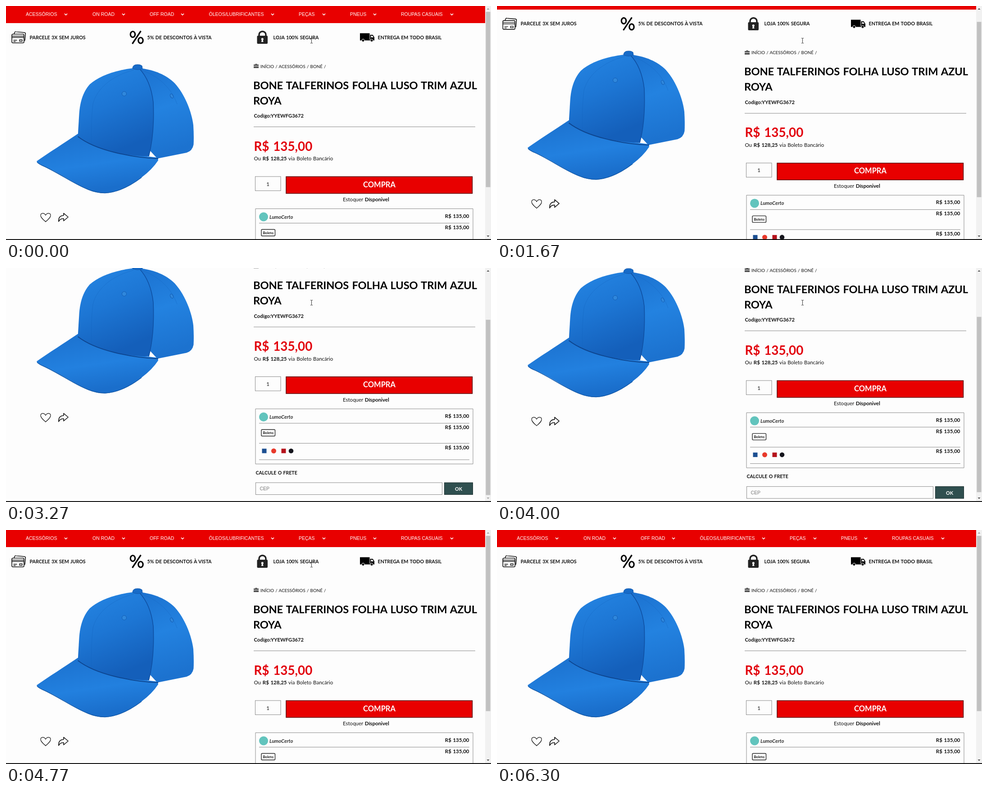
Write an HTML page that moves like this. It is 1077 px wide and 520 px high and loops after 6330 ms.

```html
<!DOCTYPE html>
<html lang="pt-BR">
<head>
<meta charset="utf-8">
<title>Loja</title>
<style>
html, body { margin: 0; width: 100%; height: 100%; overflow: hidden; background: #fdfdfd; }
svg { display: block; width: 1077px; height: 520px; }
text { font: 11.5px Lato, sans-serif; word-spacing: .07em; fill: #111; }
.b, .b text { font-weight: 700; }
.caps { font-size: 10.7px; }
.title { font-size: 23.7px; letter-spacing: -.006em; fill: #000; }
.arial { font: 10.5px "Liberation Sans", Arial, sans-serif; word-spacing: 0; }
.mid { text-anchor: middle; }
.end { text-anchor: end; }
.line { fill: none; stroke: #111; stroke-width: 1.6; stroke-linejoin: round; stroke-linecap: round; }
.rule { fill: none; stroke: #8a8a8a; }
</style>
</head>
<body>
<svg viewBox="0 0 1077 520">
  <defs>
    <linearGradient id="front" x1="0" y1="0" x2=".35" y2="1">
      <stop offset="0" stop-color="#2586e4"/><stop offset=".5" stop-color="#1d76d4"/><stop offset="1" stop-color="#145fba"/>
    </linearGradient>
    <linearGradient id="back" x1="0" y1="0" x2=".2" y2="1">
      <stop offset="0" stop-color="#1c72d0"/><stop offset=".5" stop-color="#2382e0"/><stop offset="1" stop-color="#1c72cf"/>
    </linearGradient>
    <linearGradient id="brim" x1="0" y1="0" x2=".3" y2="1">
      <stop offset="0" stop-color="#1b70cd"/><stop offset=".6" stop-color="#2280df"/><stop offset="1" stop-color="#1a6ecb"/>
    </linearGradient>
  </defs>

  <g id="page">
    <path d="M0 0H1064V38H0z" fill="#e80000"/>
    <g id="nav"></g>

    <!-- benefits -->
    <g class="line">
      <path d="M18 62L19 59Q19.500 57 22 57.300L41 59Q43.500 59.300 43.300 62L42 76L40 77"/>
      <rect x="13" y="62.500" width="27" height="19.500" rx="2.500"/>
      <path d="M13 67H40M13 70H40M17 76H24M17 79H21M30 75H36V78.500H30z" stroke-width="1.300"/>
    </g>
    <g fill="none" stroke="#000">
      <ellipse cx="281.500" cy="63" rx="5.200" ry="6.500" stroke-width="3.200"/>
      <ellipse cx="299" cy="76.500" rx="5.200" ry="6.500" stroke-width="3.200"/>
      <path d="M299.500 55.500L280.500 84" stroke-width="3.200"/>
    </g>
    <path d="M562 68V63.500A7.500 7 0 0 1 577 63.500V68" fill="none" stroke="#222" stroke-width="3.500"/>
    <rect x="557.500" y="66" width="23.500" height="18" rx="2" fill="#222"/>
    <path d="M569.300 71a2.600 2.600 0 0 1 1.400 4.800L571.500 80H567L567.900 75.800A2.600 2.600 0 0 1 569.300 71z" fill="#fff"/>
    <path d="M786 60.500H807.500V75.500H786zM808.500 64H814.500L818 69.500V76.500H786V75H808.500z"/>
    <path d="M810.500 66H813.800L816 69.700H810.500z" fill="#fff"/>
    <g stroke="#fdfdfd"><circle cx="793" cy="76.500" r="3"/><circle cx="812" cy="76.500" r="3"/></g>
    <g id="perks" class="b"></g>

    <!-- cap -->
    <path d="M296 138C330 142 356 153 375 172C400 200 413 240 416 265Q417.500 290 416.500 308Q414 322 401 326L336 339L300 300z" fill="url(#back)"/>
    <path d="M159.500 284C130 304 95 326 68 345Q69 349 78 353C118 370 150 394 182 408Q200 416 220 416C248 415 276 400 301 381Q325 363 338 343L337 337L240 325z" fill="url(#brim)"/>
    <path d="M69 347Q74 352 84 356C121 373 151 396 183 408Q200 415 220 415.500C248 414 276 400 301 381" fill="none" stroke="#1459a8" stroke-width="1.500"/>
    <path d="M283 138C240 143 206 156 186 174C170 192 164 216 162.500 240L159.500 290Q190 312 240 325Q280 334 317 334C326 300 329 260 327 214C322 180 312 155 296 138z" fill="url(#front)"/>
    <path d="M159.500 290Q188 312 240 325T338 339" fill="none" stroke="#0d458f" stroke-width="2"/>
    <path d="M296 139C315 159 324 188 327 214C329 260 326 300 317 334" fill="none" stroke="#0f50a3" stroke-width="1.600"/>
    <path d="M284 142C236 155 202 182 193 218Q188 260 190 306M300 142C337 155 367 181 380 218" fill="none" stroke="#1565bf" opacity=".45"/>
    <path d="M281 139Q281 132 288 130.500Q297 129 302 133L303 139Q292 144 281 139z" fill="#176bc8" stroke="#1258ad"/>
    <g fill="#2f87dc" stroke="#135cb2"><circle cx="262.500" cy="195" r="5"/><ellipse cx="368" cy="200" rx="3" ry="5" transform="rotate(-25 368 200)"/></g>

    <path class="line" style="stroke-width:1.200" d="M88 479.500C82 474 77 470 77 465.500C77 459 85 459 88 465C91 459 99 459 99 465.500C99 470 94 474 88 479.500z"/>
    <path class="line" d="M128 460.500L138 469L128 477.500V472.500Q120 472 117 479Q116 466 128 465.500z"/>

    <!-- product -->
    <path d="M550 130H561V133H550zM550 134H561V138H550zM553.500 130V128.500H557.500V130" fill="#555"/>
    <text x="565" y="137.500" style="font-size:9.800px">INÍCIO / ACESSÓRIOS / BONÉ /</text>
    <text class="b title" x="549" y="184.500">BONE TALFERINOS FOLHA LUSO TRIM AZUL</text>
    <text class="b title" x="549" y="218.500">ROYA</text>
    <text class="b" x="550.500" y="248" style="font-size:11.200px">Codígo:YYEWFG3672</text>
    <path class="rule" d="M550 268.500H1042"/>
    <text class="b" x="550.500" y="321.500" style="font-size:27.800px;fill:#e2000b">R$ 135,00</text>
    <text x="550.500" y="343">Ou <tspan class="b">R$ 128,25</tspan> via Boleto Bancário</text>
    <rect class="rule" x="553.500" y="379" width="56.500" height="31.500"/>
    <text class="mid" x="581.500" y="399.500">1</text>
    <rect x="622" y="379.200" width="413.500" height="37.300" fill="#e80000" stroke="#5c0a0a" stroke-width="1.500"/>
    <text class="b mid" x="829" y="402.500" style="font-size:16.500px;fill:#fff">COMPRA</text>
    <text x="748" y="434">Estoquer <tspan class="b">Dísponivel</tspan></text>

    <!-- payment -->
    <path class="rule" d="M554 450.500H1037V573H554zM562 482.500H1029M562 527H1029M562 563.500H1029"/>
    <circle cx="572" cy="468.500" r="10" fill="#62c4bd"/>
    <text class="b" x="585" y="472.500" style="font-style:italic;font-size:11.300px;fill:#333">LumoCerto</text>
    <rect x="567" y="496.500" width="30.500" height="14.500" rx="2" fill="none" stroke="#222" stroke-width="1.400"/>
    <text class="b mid" x="582.200" y="506.700" style="font-size:8px">Boleto</text>
    <path d="M568.500 539H578.500V549H568.500z" fill="#1c4f91"/>
    <circle cx="594.500" cy="544" r="5.500" fill="#e8392b"/>
    <path d="M611.500 539H621.500V549H611.500z" fill="#b5121b"/>
    <circle cx="633" cy="544" r="5.300" fill="#15151c"/>
    <g id="prices" class="b"></g>

    <!-- shipping -->
    <text class="b" x="554.500" y="596" style="font-size:10.550px">CALCULE O FRETE</text>
    <rect class="rule" x="554.500" y="614.500" width="414" height="26.500"/>
    <text class="arial" x="563.500" y="631.500" style="fill:#777">CEP</text>
    <rect x="973.500" y="614.500" width="63" height="26.500" fill="#2f4f4f" stroke="#1b2c2c"/>
    <text class="b mid" x="1005" y="632.500" style="font-size:10.800px;fill:#fff">OK</text>
  </g>

  <!-- window -->
  <path d="M1064 0H1077V520H1064z" fill="#f1f1f1"/>
  <rect id="thumb" x="1065.500" y="13" width="10" height="389.500" fill="#c1c1c1"/>
  <path id="up" d="M1067.500 8L1070.500 4.800L1073.500 8z"/>
  <path id="down" d="M1067.500 510L1070.500 513.200L1073.500 510z"/>
  <path d="M0 518H1077V520H0z" fill="#111"/>
  <path id="cursor" d="M676 71.500H678L678.500 72L679 71.500H681M678.500 72V82M676 82.500H678L678.500 82L679 82.500H681" fill="none" stroke="#333"/>
</svg>
<script>
const $ = id => document.getElementById(id);
const label = (x, y, str, cls) => `<text class="${cls}" x="${x}" y="${y}">${str}</text>`;

$('nav').innerHTML = [
  ['ACESSÓRIOS', 44, 133], ['ON ROAD', 192, 261], ['OFF ROAD', 319, 392],
  ['ÓLEOS/LUBRIFICANTES', 450.5, 592], ['PEÇAS', 650, 706], ['PNEUS', 764, 819],
  ['ROUPAS CASUAIS', 877, 990]
].map(([str, x, arrow]) =>
  label(x, 22, str, 'arial" fill="#fff" style="fill:#fff') +
  `<path d="M${arrow - 3} 17l3 3l3-3" fill="none" stroke="#fff" stroke-width="1.7"/>`
).join('');

$('perks').innerHTML = [
  ['PARCELE 3X SEM JUROS', 52.5], ['5% DE DESCONTOS À VISTA', 313.5],
  ['LOJA 100% SEGURA', 593.5], ['ENTREGA EM TODO BRASIL', 825.5]
].map(([str, x]) => label(x, 73.5, str, 'caps')).join('');

$('prices').innerHTML = [470.5, 495.5, 540]
  .map(y => label(1028.5, y, 'R$ 135,00', 'end')).join('');

const LOOP = 6330, TICK = 200, MAX = 137.5;
// wheel ticks: start time, distance
const ticks = [[1587, 79], [2068, MAX - 79], [3960, -79], [4203, 79 - MAX]];

function ease(p) {
  p = Math.min(1, Math.max(0, p));
  return p * p * (3 - 2 * p);
}

function draw(now) {
  const t = now % LOOP;
  const scroll = ticks.reduce((sum, [start, dist]) => sum + dist * ease((t - start) / TICK), 0);
  $('page').setAttribute('transform', `translate(0 ${-scroll})`);
  $('thumb').setAttribute('y', 13 + scroll * 0.742);
  $('up').setAttribute('fill', scroll < 0.5 ? '#a3a3a3' : '#505050');
  $('down').setAttribute('fill', scroll > MAX - 0.5 ? '#a3a3a3' : '#505050');
  $('cursor').style.display = t < 6200 ? '' : 'none';
}

const begin = performance.now();
function loop() {
  draw(performance.now() - begin);
  requestAnimationFrame(loop);
}
loop();
</script>
</body>
</html>
```
